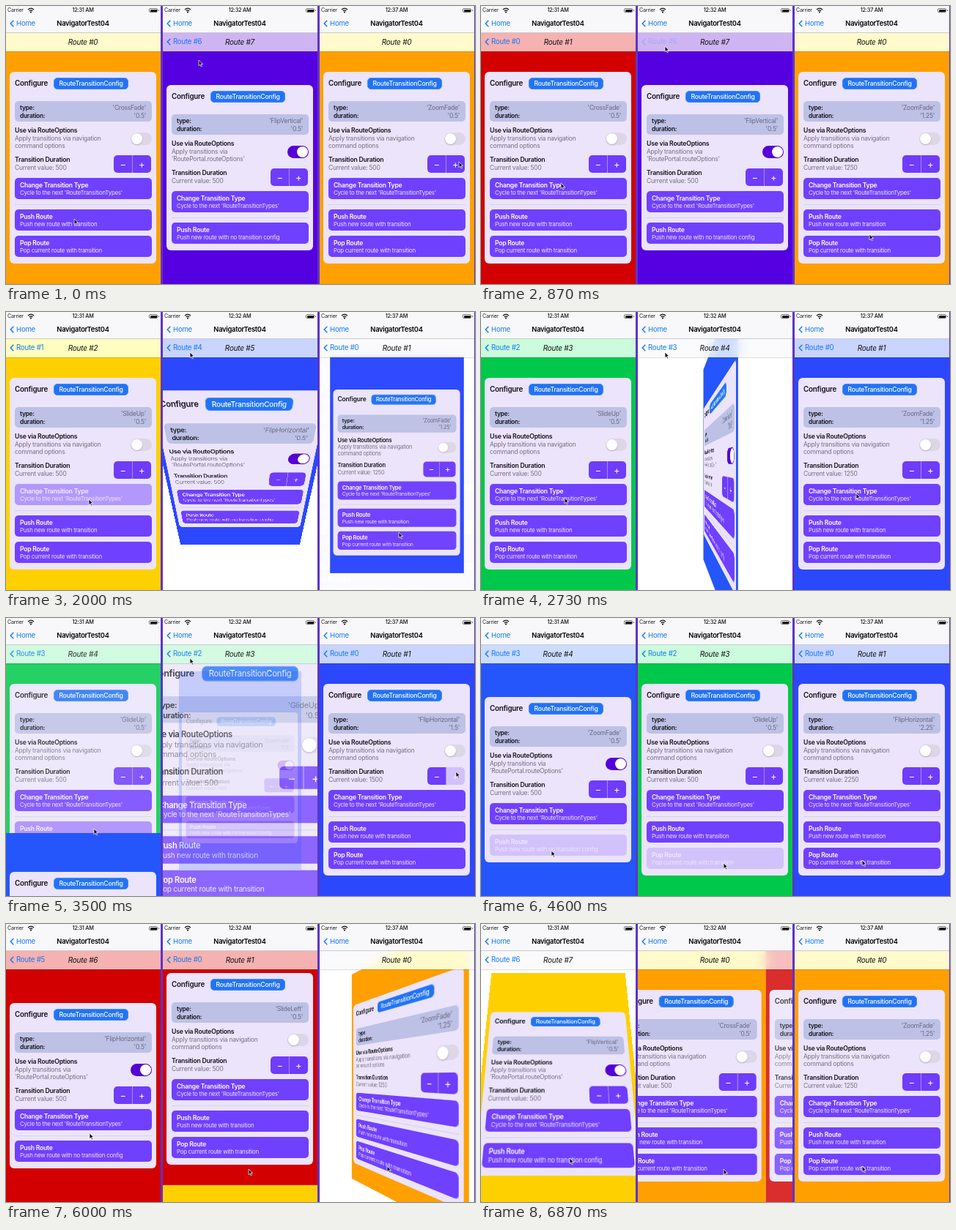
Recreate the animation shown at these times as an HTML page. Size 640x380 px, loop 7010 ms.

```html
<!DOCTYPE html>
<html lang="en">
<head>
<meta charset="utf-8">
<title>Route transitions</title>
<style>
  html, body { margin: 0; width: 100%; height: 100%; overflow: hidden; background: #fff; }
  #stage { position: relative; width: 640px; height: 380px; overflow: hidden; background: #5b34c9;
    font-family: Inter, "Liberation Sans", sans-serif; letter-spacing: -.015em; }
  #stage div, #stage svg { position: absolute; box-sizing: border-box; }
  .text { white-space: pre; line-height: 0; }
  .layer { left: 0; top: 0; width: 211px; height: 343px; overflow: hidden; }
</style>
</head>
<body>
<div id="stage"></div>
<script>
const LOOP = 7010;
const BODY_TOP = 37, BODY_H = 343, BODY_W = 211, HEADER_H = 25;
const PERSPECTIVE = 320;

// Body colour and its pale, frosted version in the route header
const COLORS = {
  orange: ['#ffa000', '#fffacb'],
  red: ['#d20000', '#f6b1b1'],
  yellow: ['#ffd000', '#fffdc0'],
  green: ['#00c84b', '#cbfbdc'],
  blue: ['#2556fb', '#cbdcff'],
  indigo: ['#2b48fd', '#c9d4ff'],
  purple: ['#5500e0', '#cfb4f2'],
};

// at: start of the screen; via/span: transition leading in; edits: later changes of its settings
const PHONES = [
  {
    clock: '12:31 AM',
    screens: [
      { at: 0, n: 0, color: 'orange', type: 'CrossFade' },
      { at: 300, via: 'CrossFade', span: 240, n: 1, color: 'red', type: 'CrossFade', edits: [[1000, { type: 'SlideLeft' }]] },
      { at: 1340, via: 'SlideLeft', span: 260, n: 2, color: 'yellow', type: 'SlideLeft', edits: [[1900, { type: 'SlideUp' }]] },
      { at: 2400, via: 'SlideUp', span: 260, n: 3, color: 'green', type: 'SlideUp', edits: [[2950, { type: 'GlideUp' }]] },
      { at: 3415, via: 'GlideUp', span: 240, n: 4, color: 'blue', type: 'GlideUp',
        edits: [[3990, { type: 'ZoomFade' }], [4290, { on: true }]] },
      { at: 4660, via: 'ZoomFade', span: 260, n: 5, color: 'purple', type: 'ZoomFade', on: true, edits: [[5200, { type: 'FlipHorizontal' }]] },
      { at: 5500, via: 'FlipHorizontal', span: 300, n: 6, color: 'red', type: 'FlipHorizontal', on: true, edits: [[6230, { type: 'FlipVertical' }]] },
      { at: 6635, via: 'FlipVertical', span: 300, n: 7, color: 'yellow', type: 'FlipVertical', on: true },
    ],
    presses: [['push', 90, 260], ['change', 900, 1060], ['push', 1220, 1360], ['change', 1850, 1935],
      ['push', 2280, 2400], ['change', 2860, 3000], ['push', 3230, 3410], ['change', 3900, 4040],
      ['push', 4480, 4650], ['change', 5090, 5240], ['push', 5380, 5500], ['change', 6180, 6300], ['push', 6500, 6630]],
    cursor: [[0, 93, 291], [300, 93, 291], [800, 109, 242], [1050, 109, 242], [1250, 113, 290], [1450, 113, 290],
      [1850, 113, 256], [2050, 113, 256], [2250, 118, 290], [2500, 118, 290], [2800, 114, 250], [3000, 114, 250],
      [3250, 120, 288], [3600, 120, 288], [3900, 113, 252], [4020, 113, 252], [4200, 183, 194], [4300, 183, 194],
      [4500, 96, 318], [4750, 96, 318], [5050, 114, 268], [5200, 114, 268], [5370, 114, 308], [5600, 114, 308],
      [5950, 114, 289], [6150, 114, 268], [6250, 114, 268], [6480, 121, 320]],
  },
  {
    clock: '12:32 AM',
    screens: [
      { at: 0, n: 7, color: 'purple', type: 'FlipVertical', on: true },
      { at: 980, via: 'FlipVertical', span: 300, n: 6, color: 'purple', type: 'FlipVertical', on: true },
      { at: 1792, via: 'FlipVertical', span: 300, n: 5, color: 'indigo', type: 'FlipHorizontal', on: true },
      { at: 2570, via: 'FlipHorizontal', span: 300, n: 4, color: 'blue', type: 'ZoomFade', on: true },
      { at: 3363, via: 'ZoomFade', span: 300, n: 3, color: 'green', type: 'GlideUp' },
      { at: 4670, via: 'GlideUp', span: 280, n: 2, color: 'yellow', type: 'SlideUp' },
      { at: 5755, via: 'SlideUp', span: 300, n: 1, color: 'red', type: 'SlideLeft' },
      { at: 6658, via: 'SlideLeft', span: 300, n: 0, color: 'orange', type: 'CrossFade' },
    ],
    presses: [['back', 840, 970], ['back', 1660, 1780], ['back', 2440, 2560], ['back', 3230, 3350],
      ['pop', 4480, 4660], ['pop', 5600, 5740], ['pop', 6500, 6640]],
    cursor: [[0, 263, 74], [100, 263, 74], [600, 251, 55], [3750, 251, 55], [4400, 331, 335]],
  },
  {
    clock: '12:37 AM',
    screens: [
      { at: 0, n: 0, color: 'orange', type: 'ZoomFade',
        edits: [[100, { ms: 750 }], [350, { ms: 1000 }], [580, { ms: 1250 }]] },
      { at: 1620, via: 'ZoomFade', span: 600, n: 1, color: 'indigo', type: 'ZoomFade', ms: 1250,
        edits: [[2800, { type: 'FlipHorizontal' }], [3370, { ms: 1500 }], [3720, { ms: 1750 }],
          [3960, { ms: 2000 }], [4200, { ms: 2250 }]] },
      { at: 5415, via: 'FlipHorizontal', span: 900, n: 0, color: 'orange', type: 'ZoomFade', ms: 1250 },
    ],
    presses: [['plus', 90, 150], ['plus', 340, 400], ['plus', 570, 630], ['push', 1480, 1600], ['change', 2740, 2860],
      ['plus', 3360, 3560], ['plus', 3710, 3770], ['plus', 3950, 4010], ['plus', 4190, 4250], ['pop', 5250, 5400]],
    cursor: [[0, 618, 213], [600, 618, 213], [850, 530, 312], [1300, 536, 301], [2250, 536, 301], [2700, 512, 248],
      [2900, 512, 248], [3300, 614, 210], [4230, 614, 210], [4550, 520, 331]],
  },
];

const clamp = v => Math.max(0, Math.min(1, v));
const ease = u => u < .5 ? 2 * u * u : 1 - 2 * (1 - u) ** 2;

const box = (x, y, w, h, style = '', inner = '') =>
  `<div style="left:${x}px;top:${y}px;width:${w}px;height:${h}px;${style}">${inner}</div>`;
const text = (x, y, size, str, style = '') =>
  `<div class="text" style="left:${x}px;top:${y}px;font-size:${size}px;${style}">${str}</div>`;
const centered = (y, size, str, style) =>
  text(0, y, size, str, `width:210px;text-align:center;${style}`);
const chevron = (y, opacity = 1) =>
  `<svg style="left:5px;top:${y - 5}px;opacity:${opacity}" width="7" height="10"><path d="M5.3 .8L1.2 5l4.1 4.2" fill="none" stroke="#1479f4" stroke-width="1.4"/></svg>`;

const BOLD = 'font-weight:600;color:#15131c;';
const GRAY = 'color:#77727f;';

function stateOf(screen, t) {
  const edits = (screen.edits || []).filter(([at]) => at <= t).map(([, change]) => change);
  return Object.assign({ ms: 500, on: false }, screen, ...edits);
}

// Opacity of a control that may be pressed on the given screen
function pressOpacity(phone, screen, key, t) {
  const press = phone.presses.filter(([k, from]) => k === key && from >= screen.at && from <= t).pop();
  return press ? .2 + .8 * clamp((t - press[2]) / 200) : 1;
}

function button(y, title, subtitle, opacity) {
  return box(12, y, 187, 29, `border-radius:5px;background:#7040ff;color:#fff;opacity:${opacity}`,
    text(7, 10, 8.6, title, 'font-weight:600') + text(7, 20, 7.9, subtitle, 'color:#eee6ff'));
}

function card(phone, screen, t) {
  const { type, ms, on } = stateOf(screen, t);
  const press = key => pressOpacity(phone, screen, key, t);
  const dy = on ? 18 : 0;
  const value = (y, str) => text(12, y, 8.5, `'${str}'`, 'width:179px;text-align:right;color:#696a80');
  const [line1, line2] = on
    ? ['Apply transitions via', "'RoutePortal.routeOptions'"]
    : ['Apply transitions via navigation', 'command options'];
  const half = (x, sign, radius, opacity) => box(x, 204, 25.5, 24,
    `background:#6e3cfa;border-radius:${radius};opacity:${opacity}`,
    text(0, 12, 13, sign, 'width:25.5px;text-align:center;color:#fff'));

  return box(0, dy - BODY_TOP, BODY_W, 380, '',
    box(5, 90, 200, on ? 226 : 262, 'border-radius:6px;background:#ebe4fb') +
    text(12, 106, 9.8, 'Configure', BOLD) +
    box(65, 98, 102, 16, 'border-radius:5px;background:#2273f4;border:1px solid #438bff',
      text(0, 7, 8.7, 'RouteTransitionConfig', 'width:100px;text-align:center;color:#fff;font-weight:500')) +
    box(12, 130, 187, 28, 'border-radius:5px;background:#bdc1e5') +
    text(19, 139, 8.4, 'type:', BOLD) + value(139, type) +
    text(19, 150, 8.4, 'duration:', BOLD) + value(150, ms / 1000) +
    text(12, 170, 8.7, 'Use via RouteOptions', BOLD) +
    text(12, 181, 8.5, line1, GRAY) + text(12, 191, 8.5, line2, GRAY) +
    box(169.5, 172.5, 29, 17, `border-radius:9px;background:${on ? '#5500d8' : '#dcd6e7'}`,
      box(on ? 13 : 1, 1, 15, 15, 'border-radius:50%;background:#fff;box-shadow:0 1px 2px #0003')) +
    text(12, 210, 8.7, 'Transition Duration', BOLD) +
    text(12, 221, 8.5, `Current value: ${ms}`, GRAY) +
    half(147, '−', '5px 0 0 5px', 1) + half(172.5, '+', '0 5px 5px 0', press('plus')) +
    box(172, 204, 1, 24, 'background:#a98bff') +
    button(235, 'Change Transition Type', "Cycle to the next 'RouteTransitionTypes'", press('change')) +
    box(12, 271, 187, 1, 'background:#d8d0e8') +
    button(278, 'Push Route', `Push new route with ${on ? 'no transition config' : 'transition'}`, press('push')) +
    (on ? '' : button(314, 'Pop Route', 'Pop current route with transition', press('pop'))));
}

// CSS for a layer; p is the eased progress
function layerStyle(via, p, incoming, pop) {
  const forward = pop ? -1 : 1;
  const slide = incoming ? forward * (1 - p) : -forward * p;
  const onTop = incoming !== pop;
  switch (via) {
    case 'CrossFade': return incoming ? `opacity:${p}` : '';
    case 'SlideLeft': return `transform:translateX(${slide * BODY_W}px);opacity:${incoming ? 1 : 1 - .22 * p}`;
    case 'SlideUp': return `transform:translateY(${slide * BODY_H}px)`;
    case 'GlideUp': return onTop
      ? `transform:translateY(${Math.abs(slide) * BODY_H}px)`
      : `opacity:${1 - .6 * (pop ? 1 - p : p)}`;
    case 'ZoomFade': {
      const fade = (1 - p) ** 3;
      return `transform:scale(${1 - slide * .5});opacity:${incoming ? 1 - fade : fade}`;
    }
    default: {
      const axis = via === 'FlipVertical' ? 'X' : 'Y';
      const angle = 90 * forward * (incoming ? 2 - 2 * p : -2 * p);
      const visible = incoming === (p >= .5);
      return `transform:perspective(${PERSPECTIVE}px) rotate${axis}(${angle}deg);` + (visible ? '' : 'display:none');
    }
  }
}

function statusBar(clock) {
  return text(2, 6, 7.2, 'Carrier', 'color:#222') +
    `<svg style="left:29px;top:2px" width="10" height="8" fill="none" stroke="#111" stroke-width="1.2"><path d="M1 3Q5 -.6 9 3M2.7 4.9Q5 2.8 7.3 4.9"/><circle cx="5" cy="6.5" r=".5"/></svg>` +
    centered(6, 7.3, clock, 'font-weight:500;color:#111') +
    box(195, 3, 12, 6, 'border:.7px solid #777;border-radius:2px', box(.7, .7, 9.2, 3.2, 'background:#111;border-radius:1px')) +
    box(207.5, 5, 1, 2, 'background:#777') +
    chevron(24) + text(14, 24, 9.6, 'Home', 'color:#1479f4') +
    centered(24, 9.3, 'NavigatorTest04', 'font-weight:600;color:#000');
}

function drawPhone(phone, index, t) {
  const i = phone.screens.findLastIndex(s => s.at <= t);
  const screen = phone.screens[i], previous = phone.screens[i - 1];
  const u = previous ? clamp((t - screen.at) / screen.span) : 1;
  const pop = !!previous && screen.n < previous.n;
  let layers = [{ screen, style: '', label: 1 }];
  if (u < 1) {
    const p = ease(u), shown = clamp(u * 2);
    layers = [
      { screen: previous, style: layerStyle(screen.via, p, false, pop), label: 1 - shown },
      { screen, style: layerStyle(screen.via, p, true, pop), label: shown },
    ];
    if (pop) layers.reverse();
  }

  const panel = (l, tone, inner = '') =>
    `<div class="layer" style="background:${COLORS[l.screen.color][tone]};${l.style}">${inner}</div>`;
  const labels = layers.map(({ screen: s, label }) => {
    const back = label * pressOpacity(phone, s, 'back', t);
    return centered(49, 10, `Route #${s.n}`, `font-style:italic;color:#111;opacity:${label}`) +
      (s.n ? chevron(49, back) + text(14, 49, 9.7, `Route #${s.n - 1}`, `color:#1479f4;opacity:${back}`) : '');
  }).join('');

  return box(index * 214, 0, BODY_W, 380, 'overflow:hidden;background:#fff',
    box(0, BODY_TOP, BODY_W, BODY_H, `clip-path:inset(${HEADER_H}px 0 0 0)`,
      layers.map(l => panel(l, 0, card(phone, l.screen, t))).join('')) +
    box(0, BODY_TOP, BODY_W, HEADER_H, 'overflow:hidden;background:#fafafc',
      layers.map(l => panel(l, 1)).join('') +
      box(0, 0, BODY_W, HEADER_H, 'backdrop-filter:blur(8px)')) +
    box(0, 0, BODY_W, BODY_TOP, 'background:#f8f8fa;border-bottom:.5px solid #c9c9cf') +
    box(0, 61.5, BODY_W, .5, 'background:#0002') +
    statusBar(phone.clock) + labels);
}

function drawCursor(keys, t) {
  const i = keys.findLastIndex(k => k[0] <= t);
  const [t0, x0, y0] = keys[i], [t1, x1, y1] = keys[i + 1] || [LOOP, x0, y0];
  const p = ease((t - t0) / (t1 - t0));
  return `<svg style="left:${x0 + (x1 - x0) * p - 1}px;top:${y0 + (y1 - y0) * p - 1}px" width="9" height="12"><path d="M1 1v7.6l1.9-1.6 1.3 2.9 1.3-.6-1.3-2.8h2.4z" fill="#111" stroke="#fff" stroke-width=".7"/></svg>`;
}

// The picture holds between four uneven steps in every half second
const STEPS = [0, 100, 230, 370];
const stage = document.getElementById('stage');
let shownTime = -1;

function tick(now) {
  const time = now % LOOP;
  const base = Math.min(6500, Math.floor(time / 500) * 500);
  const t = base + STEPS.findLast(s => s <= time - base);
  if (t !== shownTime) {
    shownTime = t;
    stage.innerHTML = PHONES.map((phone, i) => drawPhone(phone, i, t)).join('') +
      PHONES.map(phone => drawCursor(phone.cursor, t)).join('');
  }
  requestAnimationFrame(tick);
}
requestAnimationFrame(tick);
</script>
</body>
</html>
```
